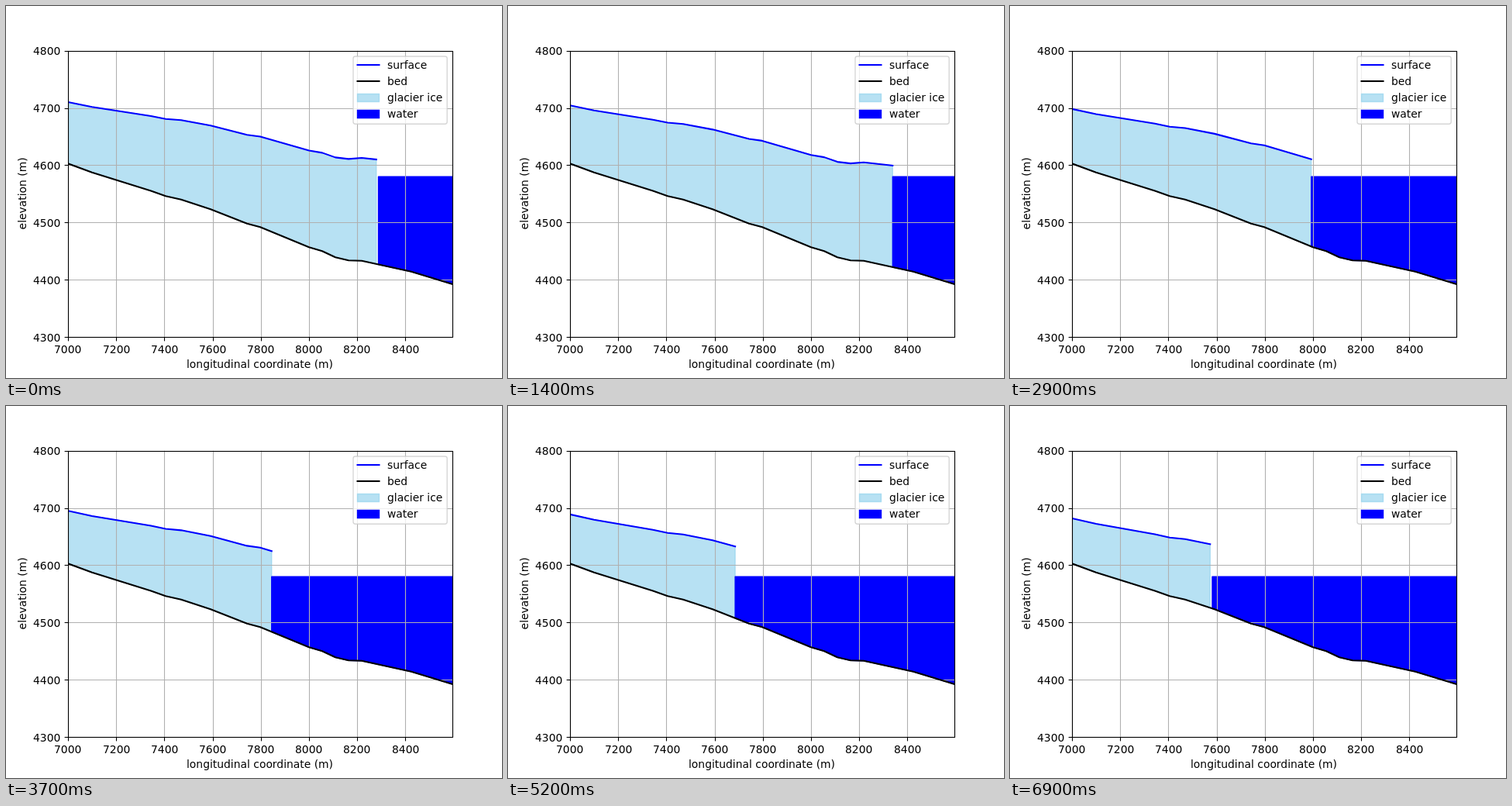
These frames come from a looping animation (640x480 px, 7900 ms). An HTML page with a canvas:

```html
<!DOCTYPE html>
<html lang="en">
<head>
<meta charset="utf-8">
<title>Glacier front</title>
<style>
html, body { margin: 0; width: 100%; height: 100%; overflow: hidden; background: #fff; }
canvas { display: block; }
</style>
</head>
<body>
<canvas id="stage" width="640" height="480"></canvas>
<script>
const ctx = document.getElementById('stage').getContext('2d');
const LOOP = 7900, STEP = 100, LAST = 69, CALVING = 21;
const L = 80, R = 576, T = 57.6, B = 427.2, WATER = 220.2;
const ICE = 'rgba(135,206,235,0.6)', BLUE = '#0000ff', BLACK = '#000', GRID = '#b0b0b0';
const THIN = 1.11, EDGE = 1.39, THICK = 2.08;

// Key points of the rock bed
const bed = [[80, 203.3], [111, 214.8], [187, 238.6], [206, 245.3], [226, 249.8],
  [264, 262.3], [311, 280.8], [328, 285.3], [391, 311.3], [408, 316.3],
  [425, 324.3], [442, 328.3], [459, 328.8], [523, 342.8], [576, 358.8]];

// Ice is thicker towards the lake and thins at a steady rate
function thickness(x, n) {
  const u = (x - L) / 100;
  const melt = Math.min(0.41, 0.305 + 0.034 * u);
  return 79.3 + 17.08 * u - 0.78 * u * u - melt * n;
}

// Slow advance until the front floats, then a decaying retreat
function frontAt(n) {
  return n <= CALVING
    ? 477.8 + 1.57 * n - 0.0177 * n * n
    : 388.7 - 87 * Math.log((n - 17.5) / 11.5);
}

// Narrow opening between ice and water near both ends of the run
const gapAt = n => 2.7 * Math.pow(2 * n / LAST - 1, 8);

function bedAt(x) {
  const i = Math.max(1, bed.findIndex(p => p[0] >= x));
  const [x0, y0] = bed[i - 1], [x1, y1] = bed[i];
  return y0 + (y1 - y0) * (x - x0) / (x1 - x0);
}

function bedBetween(from, to) {
  return [[from, bedAt(from)],
    ...bed.filter(p => p[0] > from && p[0] < to),
    [to, bedAt(to)]];
}

function trace(pts) {
  ctx.beginPath();
  pts.forEach(p => ctx.lineTo(p[0], p[1]));
}

function stroke(pts, color, width, cap = 'butt') {
  trace(pts);
  ctx.lineCap = cap;
  ctx.strokeStyle = color;
  ctx.lineWidth = width;
  ctx.stroke();
}

// Filled shape with an outline of the same colour
function area(pts, color) {
  trace(pts);
  ctx.closePath();
  ctx.fillStyle = ctx.strokeStyle = color;
  ctx.lineWidth = EDGE;
  ctx.fill();
  ctx.stroke();
}

// Text starts on a whole pixel; shift is the part of its width left of x
function text(str, x, y, shift = 0) {
  ctx.fillStyle = BLACK;
  ctx.fillText(str, Math.round(x - shift * ctx.measureText(str).width), y);
}

const snap = v => Math.floor(v + 0.5) + 0.5;
const xTicks = Array.from({ length: 8 }, (_, i) => [7000 + 200 * i, L + 62.18 * i]);
const yTicks = Array.from({ length: 6 }, (_, i) => [4300 + 100 * i, B - 73.92 * i]);

function drawGrid() {
  for (const [, x] of xTicks) stroke([[snap(x), T], [snap(x), B]], GRID, THIN);
  for (const [, y] of yTicks) stroke([[L, snap(y)], [R, snap(y)]], GRID, THIN);
}

function drawAxes() {
  ctx.lineJoin = 'miter';
  ctx.strokeStyle = BLACK;
  ctx.lineWidth = THIN;
  ctx.strokeRect(snap(L), snap(T), R - L, snap(B) - snap(T));
  for (const [label, x] of xTicks) {
    stroke([[snap(x), 427.5], [snap(x), 432.4]], BLACK, THIN);
    text(label, x, 447.5, 0.5);
  }
  for (const [label, y] of yTicks) {
    stroke([[75.6, snap(y)], [80.5, snap(y)]], BLACK, THIN);
    text(label, 70.3, y + 5.3, 1);
  }
  text('longitudinal coordinate (m)', 328, 467, 0.5);
  ctx.save();
  ctx.translate(26, 242.4);
  ctx.rotate(-Math.PI / 2);
  text('elevation (m)', 0, 0, 0.5);
  ctx.restore();
}

function drawLegend() {
  ctx.beginPath();
  ctx.roundRect(448, 65, 121.2, 87.2, 2.8);
  ctx.fillStyle = 'rgba(255,255,255,0.8)';
  ctx.fill();
  ctx.strokeStyle = 'rgba(204,204,204,0.8)';
  ctx.lineWidth = EDGE;
  ctx.stroke();

  const left = 453.5, right = 481.5;
  const line = (y, color) => stroke([[left, y], [right, y]], color, THICK, 'square');
  const patch = (y, color) =>
    area([[left, y], [right, y], [right, y + 10], [left, y + 10]], color);
  line(76, BLUE);
  line(97, BLACK);
  patch(113.5, ICE);
  patch(134.5, BLUE);
  ['surface', 'bed', 'glacier ice', 'water'].forEach((s, i) => text(s, 492, 81 + 21 * i));
}

function draw(n) {
  const front = frontAt(n), shore = front + gapAt(n);
  const floor = bedBetween(L, front);
  const surface = floor.map(([x, y]) => [x, y - thickness(x, n)]);

  ctx.fillStyle = '#fff';
  ctx.fillRect(0, 0, 640, 480);
  ctx.font = '13.89px "DejaVu Sans", sans-serif';

  ctx.save();
  ctx.beginPath();
  ctx.rect(L, T, R - L, B - T);
  ctx.clip();
  ctx.lineJoin = 'round';
  area([...surface, ...floor.reverse()], ICE);
  area([[shore, WATER], [R, WATER], ...bedBetween(shore, R).reverse()], BLUE);
  drawGrid();
  stroke(surface, BLUE, THICK, 'square');
  stroke(bed, BLACK, THICK, 'square');
  ctx.restore();

  drawAxes();
  drawLegend();
}

const start = performance.now();
function tick() {
  const t = (performance.now() - start) % LOOP;
  draw(Math.min(LAST, Math.floor(t / STEP)));
  requestAnimationFrame(tick);
}
tick();
</script>
</body>
</html>
```
